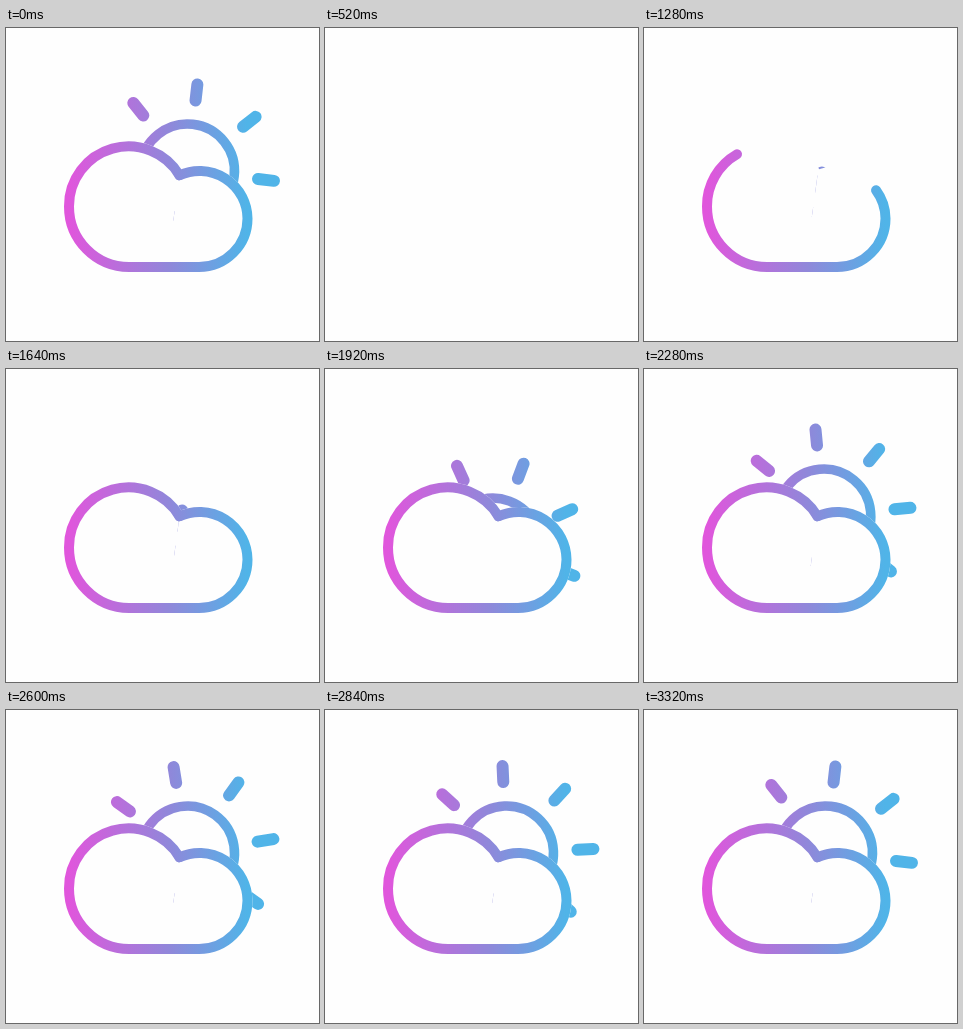
Write an HTML page without scripts that moves like this. It is 313 px wide and 313 px high and loops after 3.44 s.

```html
<!DOCTYPE html>
<html lang="en">
<head>
<meta charset="utf-8">
<title>Partly cloudy</title>
<style>
  html, body { margin: 0; height: 100%; overflow: hidden; background: #fefefe; }
  svg { display: block; width: 100vw; height: 100vh; }

  .paint, .sun, .outline { animation: 3440ms linear infinite; }
  .paint { animation-name: fade; }
  .sun { animation-name: rise; fill: none; stroke: #fff; stroke-linecap: round; }
  .disc { stroke-width: 9.5; }
  .rays { stroke-width: 12; }
  .hole { fill: #000; stroke: #000; stroke-width: 10; }
  .outline {
    animation-name: draw;
    fill: none; stroke: #fff; stroke-width: 10; stroke-linecap: round;
    stroke-dasharray: 100 200;
  }

  /* everything fades out, then the icon is rebuilt */
  @keyframes fade {
    0% { opacity: 1; }
    15.1%, 28.6% { opacity: 0; }
    28.61%, 100% { opacity: 1; }
  }
  /* both halves of the cloud grow from the middle of its base */
  @keyframes draw {
    0%, 15.1% { stroke-dashoffset: 0; }
    15.2%, 27.9% {
      stroke-dashoffset: 100;
      animation-timing-function: cubic-bezier(.62, 0, .38, 1);
    }
    44.2%, 100% { stroke-dashoffset: 0; }
  }
  /* the sun rolls up from behind the cloud, then swings back */
  @keyframes rise {
    0%, 15.1% { transform: translate(181.5px, 143px) rotate(6.5deg); }
    15.2%, 45.06% {
      transform: translate(147.5px, 226px) rotate(65.5deg);
      animation-timing-function: cubic-bezier(.36, 0, .15, 1);
    }
    75%, 77% {
      transform: translate(181.5px, 143px) rotate(-9.2deg);
      animation-timing-function: cubic-bezier(.36, 0, .15, 1);
    }
    96.5%, 100% { transform: translate(181.5px, 143px) rotate(6.5deg); }
  }
</style>
</head>
<body>
<svg viewBox="0 0 313 313">
  <defs>
    <linearGradient id="tint" gradientUnits="userSpaceOnUse" x1="63" x2="241" y1="0" y2="0">
      <stop offset="0" stop-color="#e056dc"/>
      <stop offset=".57" stop-color="#8f88da"/>
      <stop offset="1" stop-color="#50b4e8"/>
    </linearGradient>

    <g id="cloud">
      <path pathLength="100" d="M161 239H123A60 60.5 0 0 1 63 178.5A59.5 59.5 0 0 1 173.5 147.3"/>
      <path pathLength="100" d="M161 239H193A48.5 48.5 0 0 0 241.5 190.5A48 48 0 0 0 173.5 147.3"/>
    </g>
    <path id="cross" d="M71 0H87M-71 0H-87M0 71V87M0-71V-87"/>

    <clipPath id="sky"><rect x="66" width="247" height="218"/></clipPath>

    <mask id="icon" maskUnits="userSpaceOnUse" x="0" y="0" width="313" height="313">
      <g clip-path="url(#sky)">
        <g class="sun">
          <circle class="disc" r="47"/>
          <g class="rays">
            <use href="#cross"/>
            <use href="#cross" transform="rotate(45)"/>
          </g>
        </g>
      </g>
      <use class="hole" href="#cloud"/>
      <use class="outline" href="#cloud"/>
    </mask>
  </defs>

  <g class="paint">
    <rect width="313" height="313" fill="url(#tint)" mask="url(#icon)"/>
  </g>
</svg>
</body>
</html>
```
